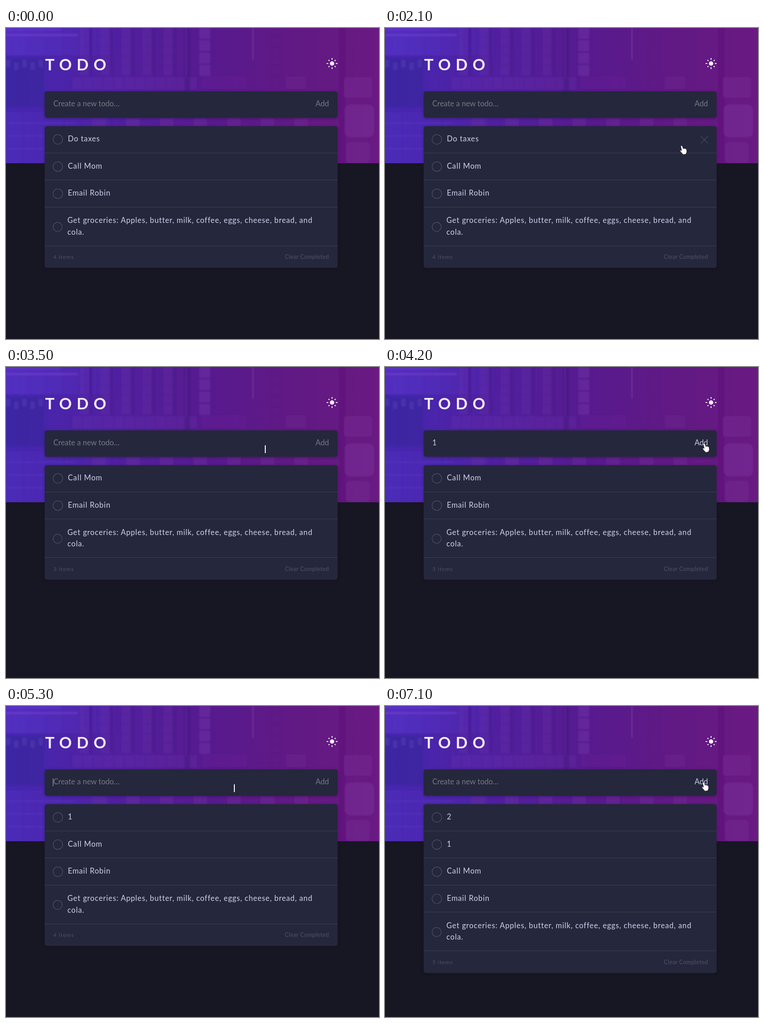
Write an HTML page that moves like this. It is 820 by 683 pixels and loops after 7200 ms.

```html
<!DOCTYPE html>
<html lang="en">
<head>
<meta charset="utf-8">
<title>Todo</title>
<style>
  html, body { margin: 0; width: 100%; height: 100%; overflow: hidden; background: #171623; }
  svg { display: block; width: 820px; height: 683px; font-family: Lato, sans-serif; }
  .panel { fill: #25273c; filter: drop-shadow(0 2px 3px rgba(14, 12, 28, .35)); }
  .title { font-size: 34.5px; font-weight: 700; letter-spacing: 10.8px; fill: #f1eefb; }
  .item { font-size: 16.5px; letter-spacing: .85px; fill: #cfd2ec; }
  .field { font-size: 16.5px; fill: #777986; }
  .field.active { fill: #c9cce6; }
  .small { font-size: 12px; letter-spacing: 1px; fill: #50526a; }
  .clear { font-size: 12.5px; letter-spacing: .35px; }
  .end { text-anchor: end; }
  .line { stroke: #3c3e52; }
  .ring, .cross { fill: none; stroke: #4d5067; stroke-width: 1.2; }
</style>
</head>
<body>
<svg viewBox="0 0 820 683">
  <defs>
    <linearGradient id="sky">
      <stop offset="0" stop-color="#4527b2"/>
      <stop offset=".3" stop-color="#5120a0"/>
      <stop offset=".55" stop-color="#571a8e"/>
      <stop offset=".8" stop-color="#621983"/>
      <stop offset="1" stop-color="#6a1a82"/>
    </linearGradient>
    <linearGradient id="glow">
      <stop offset="0" stop-color="#5632c4"/>
      <stop offset="1" stop-color="#5632c4" stop-opacity="0"/>
    </linearGradient>
    <filter id="soft"><feGaussianBlur stdDeviation="1.5"/></filter>
    <clipPath id="banner"><path d="M0 0H820V297H0Z"/></clipPath>
  </defs>
  <g clip-path="url(#banner)">
    <path fill="url(#sky)" d="M0 0H820V297H0Z"/>
    <g id="scene" filter="url(#soft)"></g>
  </g>
  <text class="title" x="86" y="93">TODO</text>
  <g id="sun" stroke="#fff" stroke-width="2" transform="translate(716.8 78)"><circle r="4.7" fill="#fff" stroke="none"/></g>
  <rect class="panel" x="85" y="139" width="644" height="58" rx="5"/>
  <text id="entry" x="104" y="172"></text>
  <path id="caret" d="M103.5 159V176" stroke="#b9bbd0"/>
  <text id="add" x="710" y="172">Add</text>
  <g id="list"></g>
  <g id="cursor"></g>
</svg>
<script>
const $ = id => document.getElementById(id);
const LOOP = 7200, TOP = 215.5, ROW = 59.6, TALL = 85, FOOT = 47.5;
const GROCERIES = ['Get groceries: Apples, butter, milk, coffee, eggs, cheese, bread, and', 'cola.'];

// Pointer stops: time, x, y
const PATH = [
  [900, 106, 575], [1200, 134, 513], [1700, 400, 345], [2100, 650, 258], [2400, 702, 246],
  [2800, 702, 246], [3200, 570, 172], [3700, 570, 172], [4100, 699.5, 167.5], [4500, 699.5, 167.5],
  [5000, 502, 172], [5400, 502, 172], [5800, 698, 167], [LOOP, 698, 167]
];
const SHAPES = {
  arrow: '<path d="M0 0H3L10 6.5L6 13.5L1 12Z" fill="#f4f2fa"/>',
  beam: '<path d="M0 0V17" stroke="#fff" stroke-width="2"/>',
  hand: `<path d="M0 1.5Q2-1 3.8 1.5L5.5 7Q7 5.5 8.3 7Q9.8 5.7 10.8 7.5Q12.5 7 13 9
    L13.5 14L11.5 19L5.5 20L1 15L-1.5 11.5Q-.5 9.5 2.3 11.2Z" fill="#fff" stroke="#17171f" stroke-width=".8"/>`
};

const block = (x, y, w, h, fill, opacity = 1, rx = 1) =>
  `<rect x="${x}" y="${y}" width="${w}" height="${h}" rx="${rx}" fill="${fill}" opacity="${opacity}"/>`;
const text = (cls, x, y, s) => `<text class="${cls}" x="${x}" y="${y}">${s}</text>`;

function buildScene() {
  let s = block(0, 0, 260, 60, 'url(#glow)', .8) + block(0, 185, 260, 112, 'url(#glow)', .35);
  s += block(0, 13, 158, 5, '#7b3fd0', .5) + block(0, 0, 120, 6, '#6d39d2', .4);
  s += block(0, 66, 84, 108, '#32218f', .4);
  for (let i = 0; i < 5; i++) s += block(i * 18, 70 + i % 2 * 6, 9, 16, '#6858cc', .25);
  for (let i = 0; i < 3; i++) s += block(0, 208 + i * 28, 150 - i * 22, 2, '#6e50d5', .25);
  for (let i = 0; i < 5; i++) {
    const x = 162 + i * 46;
    s += block(x, 0, 20, 104, '#6f35ac', .22) + block(x + 21, 0, 7, 104, '#43157f', .35);
    for (let y = 18; y < 100; y += 21) s += block(x, y, 20, 2, '#4b1d8c', .35);
  }
  s += block(145, 108, 275, 27, '#6f3cb0', .22, 3);
  for (let i = 0; i < 12; i++) s += block(144 + i * 23, 108, 2, 27, '#48198a', .4);
  s += block(392, 0, 13, 140, '#42137c', .45) + block(395, 0, 2, 110, '#8242b0', .4);
  for (let y = 0; y < 105; y += 27) s += block(425, y, 24, 24, '#7838ab', .45, 2);
  s += block(542, 0, 2, 70, '#9856bc', .5);
  s += block(615, 106, 45, 28, '#772f98', .25, 4) + block(430, 106, 100, 28, '#6d2b9c', .25, 4);
  for (let i = 0; i < 7; i++) s += block(190 + i * 74, 198, 30, 18, '#7c399f', .25);
  s += block(732, 0, 14, 297, '#55146f', .25);
  s += block(743, 108, 62, 45, '#762c93', .55, 6) + block(745, 168, 64, 72, '#772f97', .6, 12);
  return s + block(748, 250, 52, 47, '#722890', .5, 8);
}

function pointerAt(t) {
  if (t < PATH[0][0]) return null;
  const i = PATH.findIndex(p => p[0] > t);
  const [t0, x0, y0] = PATH[i - 1], [t1, x1, y1] = PATH[i];
  const k = (t - t0) / (t1 - t0);
  return { x: x0 + (x1 - x0) * k, y: y0 + (y1 - y0) * k };
}

function itemsAt(t) {
  const names = ['Call Mom', 'Email Robin'];
  if (t < 2700) names.unshift('Do taxes');
  if (t >= 4400) names.unshift('1');
  if (t >= 5900) names.unshift('2');
  return names;
}

function listMarkup(names, pointer) {
  const tallTop = TOP + names.length * ROW, footTop = tallTop + TALL;
  const line = y => `<path class="line" d="M85 ${Math.floor(y) - .5}H729"/>`;
  const ring = (x, y, r) => `<circle class="ring" cx="${x}" cy="${y}" r="${r}"/>`;
  let s = `<rect class="panel" x="85" y="${TOP}" width="644" height="${footTop + FOOT - TOP}" rx="5"/>`;
  const hover = (top, height) => pointer && pointer.x > 85 && pointer.y >= top && pointer.y < top + height
    ? `<path class="cross" d="M694 ${top + height / 2 - 8}l16 16m0-16l-16 16"/>` : '';
  names.forEach((name, i) => {
    const y = TOP + i * ROW;
    s += ring(114, y + 29.2, 10.5) + text('item', 136, y + 33.5, name) + line(y + ROW) + hover(y, ROW);
  });
  s += ring(113.5, tallTop + 42.5, 10) + hover(tallTop, TALL) + line(footTop);
  GROCERIES.forEach((words, i) => s += text('item', 135, tallTop + 34 + i * 25.5, words));
  return s + text('small', 104, footTop + 28, `${names.length + 1} items`)
    + text('small clear end', 710, footTop + 28, 'Clear Completed');
}

function draw(t) {
  const p = pointerAt(t);
  const typed = t >= 3600 && t < 4400 ? '1' : t >= 5500 && t < 5900 ? '2' : '';
  const overInput = p && p.y > 139 && p.y < 197;
  const overAdd = overInput && p.x > 672;
  const focused = t >= 3300 && t < 4100 || t >= 5100 && t < 5700;

  $('entry').textContent = typed || 'Create a new todo…';
  $('entry').setAttribute('class', typed ? 'field active' : 'field');
  $('add').setAttribute('class', overAdd ? 'field active end' : 'field end');
  $('caret').setAttribute('visibility', focused && t % 1000 < 500 ? 'visible' : 'hidden');
  $('caret').setAttribute('transform', `translate(${typed ? 9 : 0})`);
  $('list').innerHTML = listMarkup(itemsAt(t), p);

  const shape = t < 1300 ? 'arrow' : overInput && !overAdd ? 'beam' : 'hand';
  $('cursor').innerHTML = p ? SHAPES[shape] : '';
  if (p) $('cursor').setAttribute('transform', `translate(${p.x} ${p.y})`);
}

$('scene').innerHTML = buildScene();
for (let i = 0; i < 8; i++)
  $('sun').innerHTML += `<path d="M0 ${i % 2 ? -8 : -8.3}V${i % 2 ? -11 : -12}" transform="rotate(${i * 45})"/>`;

const start = performance.now();
let last = -1;
function tick() {
  const t = Math.floor((performance.now() - start) % LOOP / 100) * 100;
  if (t !== last) draw(last = t);
  requestAnimationFrame(tick);
}
tick();
</script>
</body>
</html>
```
